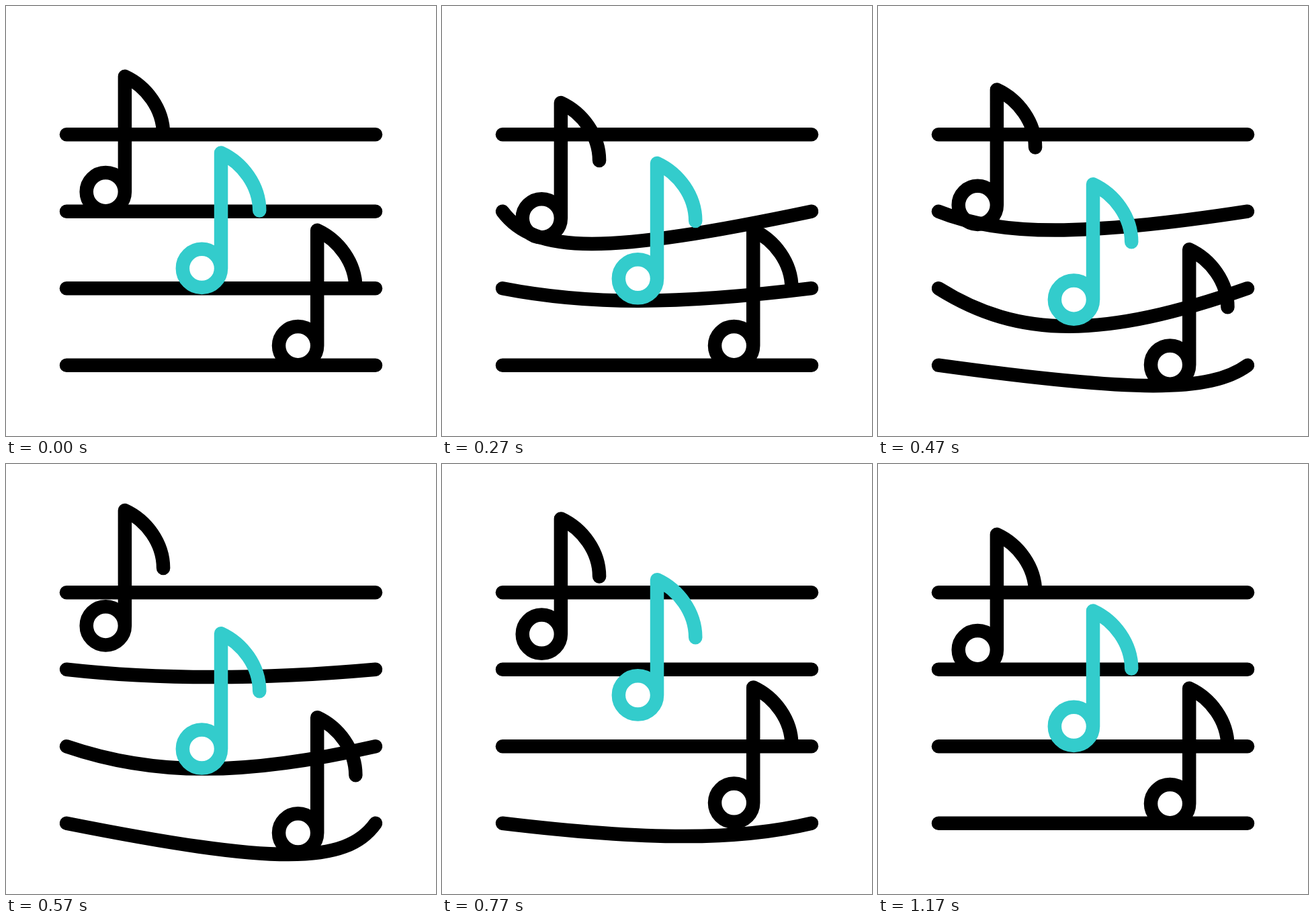
Recreate the animation shown at these times as an HTML page with a canvas. Size 640 by 640 pixels, loop 1670 ms.

```html
<!DOCTYPE html>
<html lang="en">
<head>
<meta charset="utf-8">
<title>Notes on a staff</title>
<style>
  html, body { margin: 0; width: 100%; height: 100%; overflow: hidden; background: #fff; }
  canvas { display: block; width: 640px; height: 640px; }
</style>
</head>
<body>
<canvas id="stage" width="640" height="640"></canvas>
<script>
const ctx = document.getElementById('stage').getContext('2d');
const LOOP = 1670;
const STEP = 1000 / 30;
const BLACK = '#000';
const TEAL = '#33cccc';
const LEFT = 90;
const RIGHT = 550;
const STAFF_TOP = 191.2;
const STAFF_GAP = 114.5;
const REST_HANDLE = (RIGHT - LEFT) / 3;

const mix = (a, b, p) => a + (b - a) * p;
const cubic = (a, b, s) => 3 * a * s * (1 - s) ** 2 + 3 * b * s * s * (1 - s) + s ** 3;

// Same meaning as CSS cubic-bezier().
function bezier(x1, y1, x2, y2) {
  return p => {
    let low = 0, high = 1;
    for (let i = 0; i < 24; i++) {
      const mid = (low + high) / 2;
      if (cubic(x1, x2, mid) < p) low = mid; else high = mid;
    }
    return cubic(y1, y2, low);
  };
}

const linear = p => p;
const sink = bezier(0.33, 0, 0.5, 0.68);
const launch = bezier(0.6, 0.03, 0.4, 1);
const settle = bezier(0.4, 0.36, 0.67, 1);
const relax = bezier(0.33, 0.5, 0.67, 0.67);
const straighten = bezier(0.33, 0.1, 0.6, 0.9);

// Steps are counted from the start of each note's bounce.
const NOTE_DROP = [
  { at: 0, value: 0 },
  { at: 10, value: 46.7, ease: sink },
  { at: 20, value: -47.4, ease: launch },
  { at: 27, value: 0, ease: settle }
];
const LINE_SAG = [
  { at: 0, value: 0 },
  { at: 10, value: 50, ease: sink },
  { at: 19, value: 0, ease: relax }
];
const LINE_PULL = [
  { at: 0, value: 0.65 },
  { at: 10, value: 1, ease: linear },
  { at: 19, value: 0, ease: straighten }
];

// left/right: handle lengths of the line under the note at full pull.
const VOICES = [
  { color: BLACK, scale: 1.15, left: 40, right: 318 },
  { color: TEAL, scale: 1.13, left: 120, right: 214 },
  { color: BLACK, scale: 1, left: 318, right: 40 }
].map((voice, i) => ({
  ...voice,
  delay: i * 4,
  x: 176.9 + i * 143.15,
  y: 104.8 + i * STAFF_GAP,
  lineY: STAFF_TOP + (i + 1) * STAFF_GAP
}));
VOICES[1].y -= 0.7;

function sample(keys, step) {
  const next = keys.findIndex(key => key.at > step);
  if (next === 0) return keys[0].value;
  if (next < 0) return keys[keys.length - 1].value;
  const from = keys[next - 1], to = keys[next];
  return mix(from.value, to.value, to.ease((step - from.at) / (to.at - from.at)));
}

function drawLine(y, sag = 0, left = REST_HANDLE, right = REST_HANDLE) {
  const handleY = y + sag * 4 / 3;
  ctx.strokeStyle = BLACK;
  ctx.beginPath();
  ctx.moveTo(LEFT, y);
  ctx.bezierCurveTo(LEFT + left, handleY, RIGHT - right, handleY, RIGHT, y);
  ctx.stroke();
}

function drawBentLine({ lineY, scale, left, right }, step) {
  const pull = sample(LINE_PULL, step);
  drawLine(lineY, sample(LINE_SAG, step) * scale,
    mix(REST_HANDLE, left, pull), mix(REST_HANDLE, right, pull));
}

function drawNote({ x, y, color }, step) {
  ctx.save();
  ctx.translate(x, y + sample(NOTE_DROP, step));
  ctx.strokeStyle = color;
  ctx.beginPath();
  ctx.arc(-28.6, 171.8, 28.6, 0, Math.PI * 2);
  ctx.closePath();
  ctx.moveTo(0, 171.8);
  ctx.lineTo(0, 0);
  ctx.bezierCurveTo(32, 14.8, 57.2, 48.5, 57.2, 86);
  ctx.stroke();
  ctx.restore();
}

function draw(time) {
  const step = Math.floor((time % LOOP + 3.5) / STEP);
  ctx.fillStyle = '#fff';
  ctx.fillRect(0, 0, 640, 640);
  ctx.lineWidth = 20.5;
  ctx.lineCap = ctx.lineJoin = 'round';

  drawLine(STAFF_TOP);
  for (const voice of VOICES) drawBentLine(voice, step - voice.delay);
  for (const voice of VOICES) drawNote(voice, step - voice.delay);
}

const start = performance.now();
function tick() {
  draw(performance.now() - start);
  requestAnimationFrame(tick);
}
tick();
</script>
</body>
</html>
```
